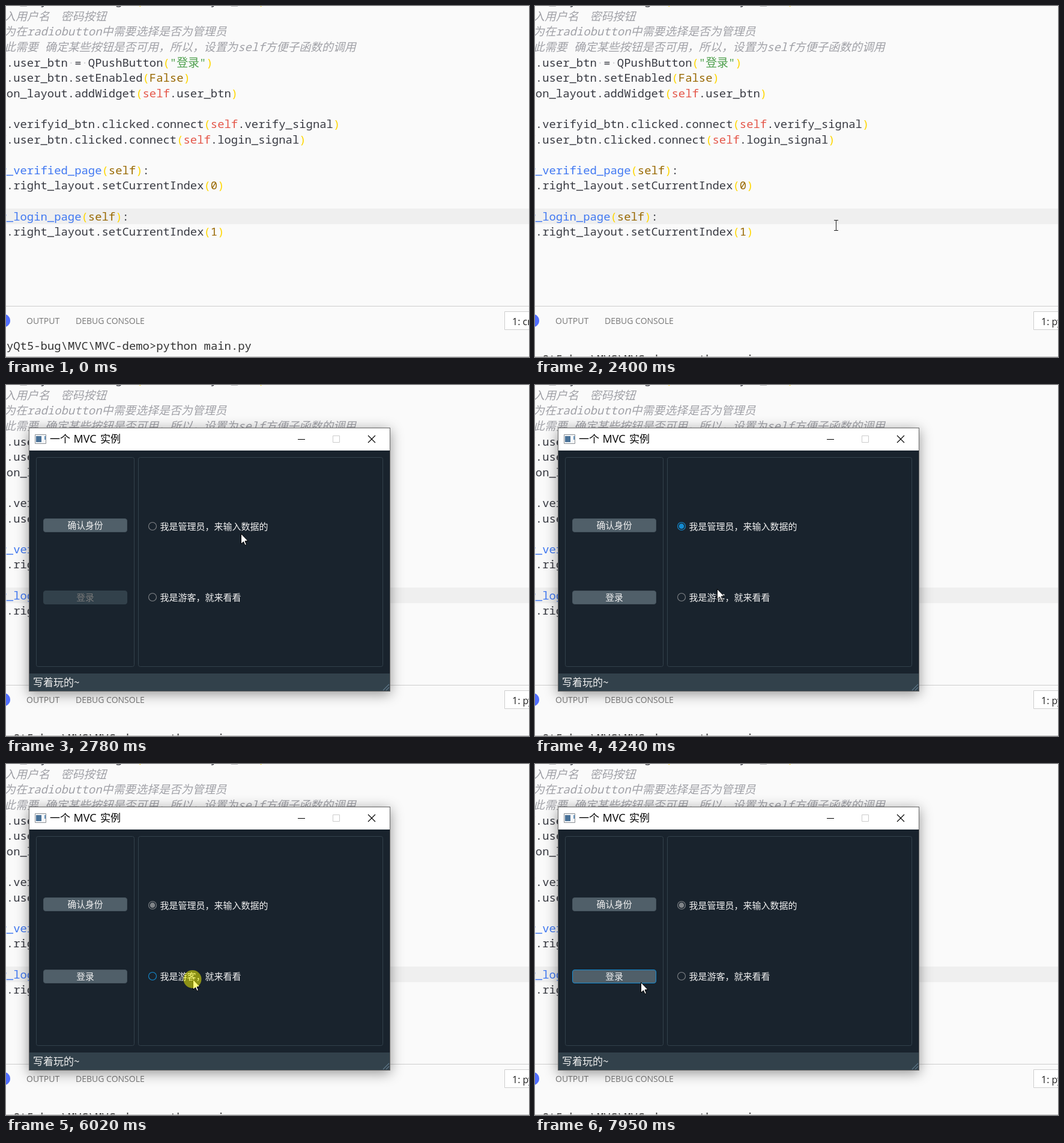
Animation of 871 by 584 pixels, one loop 8 s. Source, as an HTML page with a canvas:

```html
<!DOCTYPE html>
<html lang="zh-CN">
<head>
<meta charset="utf-8">
<style>
html, body { margin: 0; width: 100%; height: 100%; overflow: hidden; background: #fafafa; }
canvas { display: block; }
</style>
</head>
<body>
<canvas id="stage" width="871" height="584"></canvas>
<script>
const ctx = document.getElementById('stage').getContext('2d');
const LOOP = 8000, STEP = 77.15;
const RUN = 1300, MOUSE = 1985, OPEN = 2620, READY = 2780;

const CJK = '"Noto Sans CJK SC", "Noto Sans CJK", sans-serif';
const MONO = '18.9px "Noto Sans Mono", "Noto Sans CJK SC", monospace';
const UI = '"Open Sans", sans-serif';
const CELL = 11.34, LINE = 25.6;
const LEFT = 0.9 - 12 * CELL, TOP = -1.8;

const SOURCE = `        button_layout.addWidget(self.verifyid_btn)
        # 输入用户名\u3000密码按钮
        # 因为在radiobutton中需要选择是否为管理员
        # 因此需要 确定某些按钮是否可用\uff0c所以\uff0c设置为self方便子函数的调用
        self.user_btn·=·QPushButton("登录")
        self.user_btn.setEnabled(False)
        button_layout.addWidget(self.user_btn)

        self.verifyid_btn.clicked.connect(self.verify_signal)
        self.user_btn.clicked.connect(self.login_signal)

    def show_verified_page(self):
        self.right_layout.setCurrentIndex(0)

    def show_login_page(self):
        self.right_layout.setCurrentIndex(1)`.split('\n');

// Where the pointer stops; entries with a hit are clicks.
const STOPS = [
  { x: 606, y: 501, down: 1990, up: 1990 },
  { x: 421, y: 261, down: 2703, up: 2703 },
  { x: 391, y: 247, down: 2780, up: 2780 },
  { x: 304, y: 224, down: 3245, up: 3398, hit: 'admin' },
  { x: 303, y: 358, down: 4548, up: 4700, hit: 'guest' },
  { x: 323, y: 232, down: 5250, up: 5405, hit: 'admin' },
  { x: 311, y: 358, down: 5945, up: 6178, hit: 'guest' },
  { x: 318, y: 223, down: 7025, up: 7108, hit: 'admin' },
  { x: 176, y: 363, down: 7715, up: 7878, hit: 'login' }
];
const CLICKS = STOPS.filter(s => s.hit);
const RADIOS = CLICKS.filter(s => s.hit !== 'login');

const lastHit = (list, edge, t) => list.reduce((hit, s) => t >= s[edge] ? s.hit : hit, '');

function pointerAt(t) {
  t = READY + Math.floor((t - READY) / STEP + 0.2) * STEP;
  const next = STOPS.findIndex(s => s.down > t);
  if (next < 1) return next ? STOPS[STOPS.length - 1] : STOPS[0];
  const a = STOPS[next - 1], b = STOPS[next];
  const u = Math.min(1, Math.max(0, (t - a.up) / Math.min(985, b.down - a.up)));
  return { x: Math.round(a.x + (b.x - a.x) * u), y: Math.round(a.y + (b.y - a.y) * u) };
}

function rect(x, y, w, h, color) {
  ctx.fillStyle = color;
  ctx.fillRect(x, y, w, h);
}

function text(str, x, y, font, color) {
  ctx.font = font;
  ctx.fillStyle = color;
  ctx.fillText(str, x, y);
  return ctx.measureText(str).width;
}

function paint(fill, border, width = 1) {
  if (fill) { ctx.fillStyle = fill; ctx.fill(); }
  if (border) { ctx.strokeStyle = border; ctx.lineWidth = width; ctx.stroke(); }
}

function line(x1, y1, x2, y2, color) {
  ctx.beginPath();
  ctx.moveTo(x1, y1);
  ctx.lineTo(x2, y2);
  paint(null, color, 1.1);
}

function box(x, y, w, h, r, border, fill) {
  ctx.beginPath();
  ctx.roundRect(x + 0.5, y + 0.5, w - 1, h - 1, r);
  paint(fill, border);
}

function circle(x, y, r, fill, border) {
  ctx.beginPath();
  ctx.arc(x, y, r, 0, 7);
  paint(fill, border, 1.1);
}

function shape(x, y, points) {
  ctx.beginPath();
  points.forEach(([a, b]) => ctx.lineTo(x + 0.5 + a, y + 0.5 + b));
  ctx.closePath();
  paint('#fff', '#000');
}

function tokenColor(token, inDef) {
  if (token[0] === '"') return '#50a14f';
  if (/[()]/.test(token)) return '#ffd700';
  if (token === '·') return '#d3d3d6';
  if (token === 'self') return inDef ? '#986801' : '#e45649';
  if (token === 'False' || /^\d/.test(token)) return '#986801';
  return inDef && /\w/.test(token) ? '#4078f2' : '#383a42';
}

function drawCode(src, y) {
  let x = LEFT;
  if (src.includes('#')) return text(src, x, y, 'italic 300 ' + MONO, '#a0a1a7');
  const inDef = src.includes('def ');
  for (const token of src.match(/"[^"]*"|\w+|\s+|./g) || []) {
    const weight = /[()]/.test(token) ? '500 ' : '300 ';
    x += text(token, x, y, weight + MONO, tokenColor(token, inDef));
  }
}

function drawEditor() {
  rect(0, 0, 871, 584, '#fafafa');
  rect(0, 337, 871, 26, '#efefef');
  SOURCE.forEach((src, i) => drawCode(src, TOP + i * LINE));
}

function drawPanel(running) {
  rect(0, 499, 871, 1, '#cdcdcd');
  circle(-4, 523.5, 11, '#526fff');
  text('OUTPUT', 34, 529, '14px ' + UI, '#777');
  text('DEBUG CONSOLE', 116, 529, '14px ' + UI, '#777');
  box(830, 508, 60, 31, 0, '#cecece', '#fff');
  text(running ? '1: python' : '1: cmd', 843, 530.5, '16px ' + UI, '#222');
  text('PyQt5-bug\\MVC\\MVC-demo>python main.py', 0.9 - CELL, running ? 594 : 572, '300 ' + MONO, '#333');
  rect(0, 583, 871, 1, '#c4c4c4');
}

function drawTitleBar() {
  box(48, 82, 19, 16, 0, '#8a8f94', '#f4f6f8');
  rect(50, 85, 9, 10, '#4a7298');
  rect(64, 85, 2, 6, '#6d9bc4');
  text('一个', 73, 96.4, '17px ' + CJK, '#000');
  text('MVC', 112.5, 96, '18px ' + UI, '#000');
  text('实例', 157, 96.4, '17px ' + CJK, '#000');
  rect(486, 90, 12, 1, '#000');
  box(544, 84, 12, 12, 0, '#ccc');
  line(603, 84, 615, 96, '#000');
  line(615, 84, 603, 96, '#000');
}

function drawButton(y, label, enabled, active) {
  const fill = enabled ? '#505f69' : '#32414b';
  box(62, y, 140, 23, 3.5, active ? '#148cd2' : enabled ? '#46545e' : fill, fill);
  ctx.textAlign = 'center';
  text(label, 132, y + 16.7, '300 14.8px ' + CJK, enabled ? '#f0f0f0' : '#787878');
  ctx.textAlign = 'left';
}

function drawRadio(y, label, checked, active) {
  const color = active ? '#148cd2' : '#808488';
  circle(244, y, 6.5, null, color);
  if (checked) circle(244, y, 4.4, color);
  text(label, 256.5, y + 5.6, '300 15px ' + CJK, '#f0f0f0');
}

function drawForm(t, p) {
  const checked = lastHit(RADIOS, 'up', t), focus = lastHit(CLICKS, 'down', t);
  const canLogin = lastHit(RADIOS, 'up', t - STEP) === 'admin' && t > CLICKS[0].up + 150;
  const over = (x, y, w) => p.x >= x && p.x < x + w && Math.abs(p.y - y) < 12;
  rect(39, 109, 600, 371, '#19232d');
  box(50, 120, 164, 349, 3, '#32414b');
  box(220, 120, 408, 349, 3, '#32414b');
  drawButton(222, '确认身份', true, over(62, 233, 140));
  drawButton(342, '登录', canLogin, canLogin && (focus === 'login' || over(62, 353, 140)));
  drawRadio(235, '我是管理员\uff0c来输入数据的', checked === 'admin', focus === 'admin' || over(237, 235, 200));
  drawRadio(353, '我是游客\uff0c就来看看', checked === 'guest', focus === 'guest' || over(237, 353, 155));
  rect(39, 480, 600, 29, '#32414b');
  text('写着玩的~', 45, 501.2, '17px ' + CJK, '#f0f0f0');
  line(628, 508, 638, 498, '#60798b');
  line(633, 508, 638, 503, '#60798b');
}

function drawWindow(t, p) {
  ctx.save();
  ctx.shadowColor = 'rgba(0,0,0,.42)';
  ctx.shadowBlur = 20;
  ctx.shadowOffsetY = 4;
  rect(38, 71, 602, 439, '#666');
  ctx.restore();
  rect(39, 72, 600, 437, '#fff');
  drawTitleBar();
  if (t >= READY) drawForm(t, p);
}

function drawArrow(x, y) {
  shape(x, y, [[0, 0], [0, 17], [4, 13.3], [6.6, 19], [9, 18], [6.5, 12.3], [11.5, 12]]);
}

function drawResize(x, y) {
  const half = [[-1.5, -6.5], [-4.5, -6.5], [0, -11.5], [4.5, -6.5], [1.5, -6.5]];
  shape(x, y, half.concat(half.map(([a, b]) => [-a, -b])));
}

function drawBeam(x, y) {
  rect(x, y - 9, 1, 18, '#222');
  rect(x - 3, y - 9, 7, 1, '#222');
  rect(x - 3, y + 8, 7, 1, '#222');
}

function drawPointer(t, { x, y }) {
  const draw = t >= OPEN ? drawArrow : y > 490 ? drawResize : drawBeam;
  draw(x, y);
  if (CLICKS.some(c => t >= c.down && t < c.up)) circle(x - 0.5, y, 15, 'rgba(255,255,0,.5)');
}

function frame() {
  const t = (performance.now() - start) % LOOP, p = pointerAt(t);
  drawEditor();
  drawPanel(t >= RUN);
  if (t >= OPEN) drawWindow(t, p);
  if (t >= MOUSE) drawPointer(t, p);
  requestAnimationFrame(frame);
}

const start = performance.now();
frame();
</script>
</body>
</html>
```
